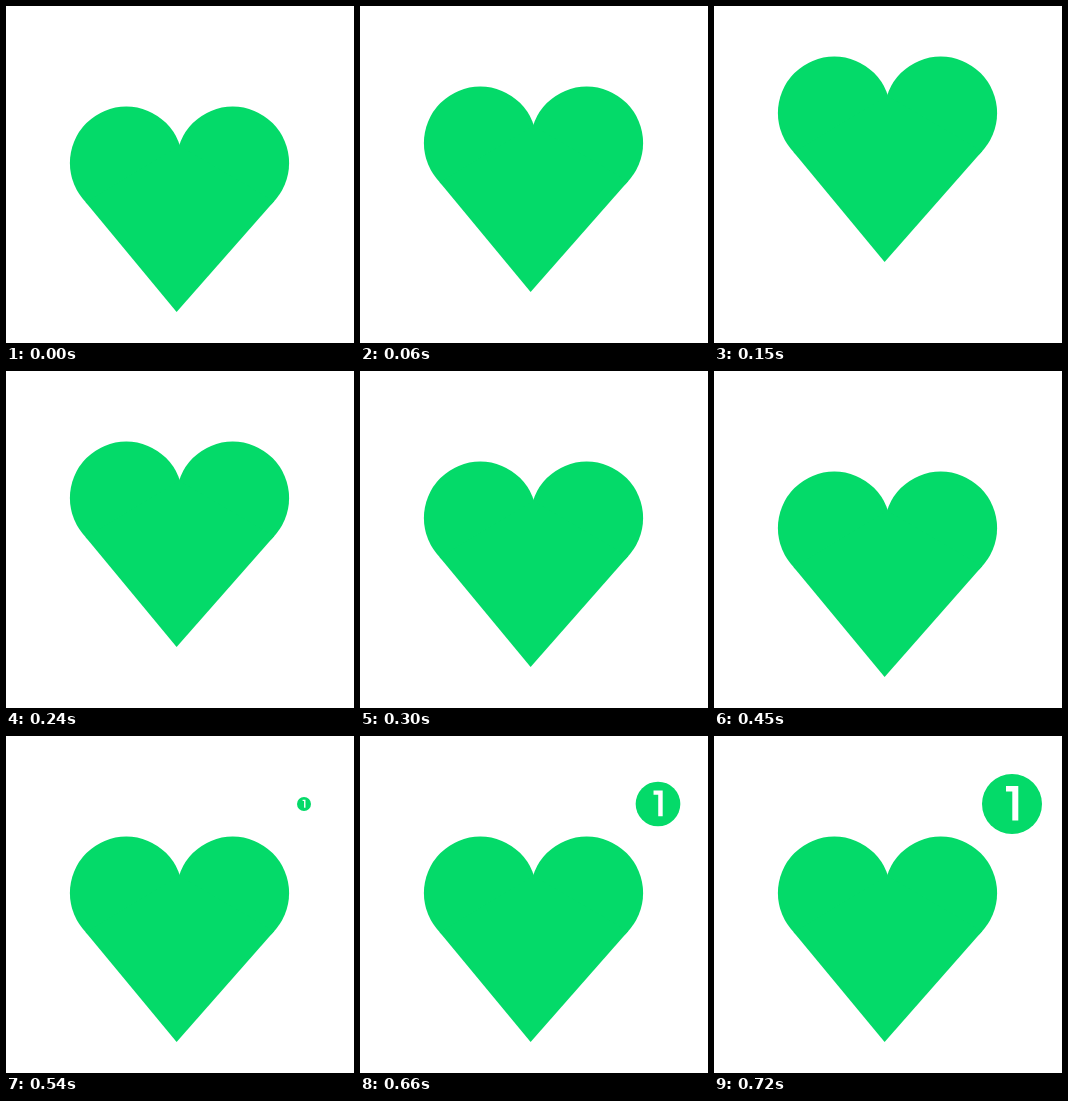
These frames come from a looping animation (348x337 px, 1920 ms). An HTML page with a canvas:

```html
<!DOCTYPE html>
<html lang="en">
<head>
<meta charset="utf-8">
<title>Heart with badge</title>
<style>
  html, body { margin: 0; width: 100%; height: 100%; overflow: hidden; background: #fff; }
  canvas { display: block; }
</style>
</head>
<body>
<canvas id="stage" width="348" height="337" role="img" aria-label="A heart hops and a badge reading 1 pops up"></canvas>
<script>
const ctx = document.getElementById('stage').getContext('2d');
const GREEN = '#04da69';
const LOOP = 1920;
const STEP = 30;

const clamp = v => Math.min(1, Math.max(0, v));
const progress = (t, from, to) => clamp((t - from) / (to - from));

function disc(x, y, r) {
  ctx.beginPath();
  ctx.arc(x, y, r, 0, Math.PI * 2);
  ctx.fill();
}

function polygon(points) {
  ctx.beginPath();
  points.forEach(([x, y]) => ctx.lineTo(x, y));
  ctx.closePath();
  ctx.fill();
}

function drawHeart(lift) {
  ctx.save();
  ctx.translate(0, -lift);
  ctx.fillStyle = GREEN;
  disc(120.3, 157, 56.4);
  disc(226.7, 157, 56.4);
  polygon([[79.5, 196], [173.5, 139.5], [268.3, 195], [170.6, 306]]);
  ctx.restore();
}

function drawBadge(scale) {
  ctx.save();
  ctx.translate(298, 68);
  ctx.scale(scale, scale);
  ctx.fillStyle = GREEN;
  disc(0, 0, 30);
  ctx.fillStyle = '#fff';
  polygon([[-6, -18], [6.3, -18], [6.3, 16.6], [0.3, 16.6], [0.3, -12.4], [-6, -12.4]]);
  ctx.restore();
}

function draw(now) {
  const t = Math.floor((now % LOOP) / STEP) * STEP;
  ctx.fillStyle = '#fff';
  ctx.fillRect(0, 0, 348, 337);
  drawHeart(50 * (progress(t, 0, 150) - progress(t, 180, 330)));
  if (t >= 540) drawBadge(7 / 30 + 23 / 30 * progress(t, 540, 720));
}

const start = performance.now();
function tick() {
  draw(performance.now() - start);
  requestAnimationFrame(tick);
}
tick();
</script>
</body>
</html>
```
